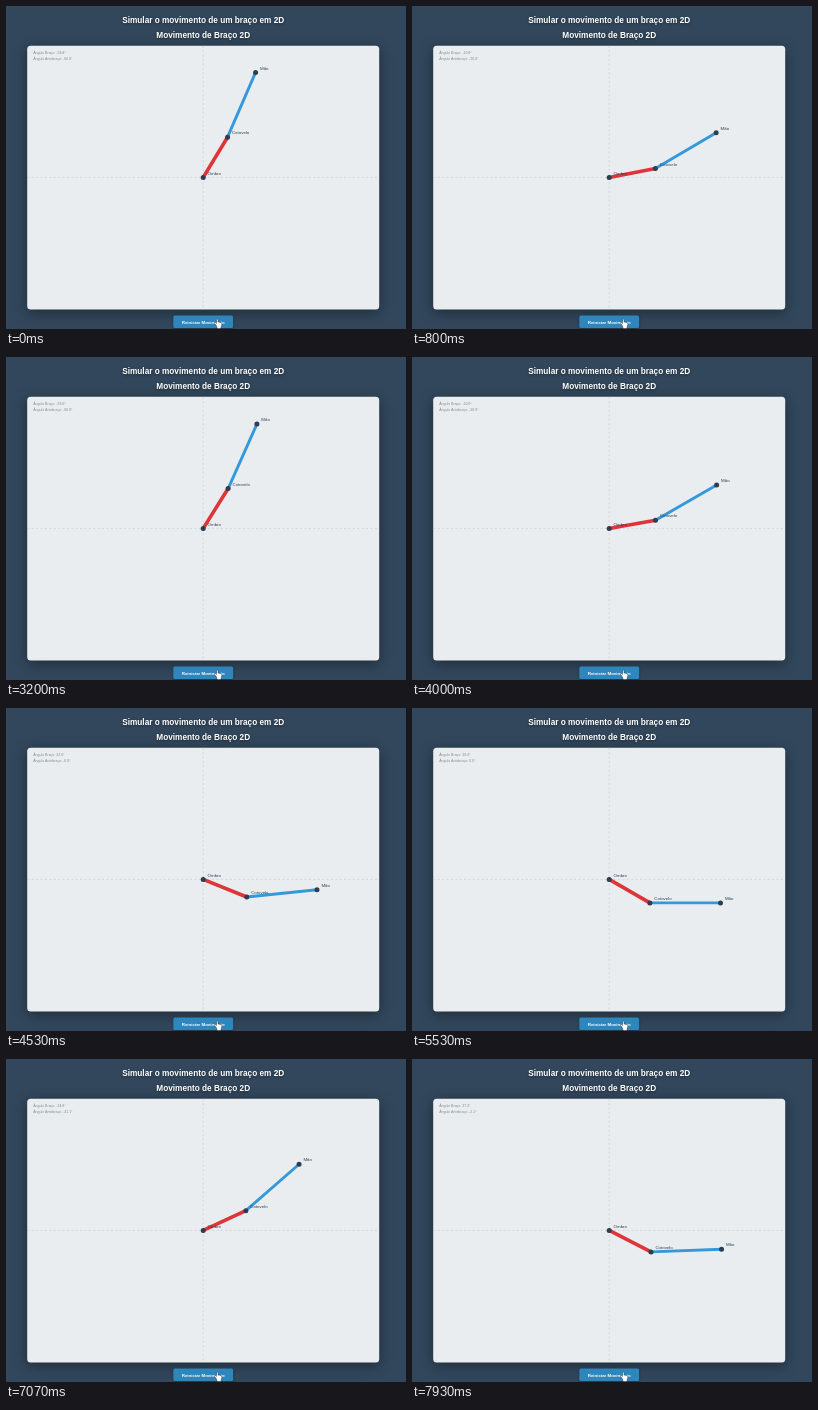
An HTML page with a canvas that plays this animation: 400x323 px, repeating every 8000 ms.

```html
<!DOCTYPE html>
<html lang="pt">
<head>
<meta charset="utf-8">
<title>Movimento de Braço 2D</title>
<style>
  html, body { margin: 0; width: 100%; height: 100%; overflow: hidden; background: #32475c; }
  canvas { display: block; width: 400px; height: 323px; }
</style>
</head>
<body>
<canvas id="stage"></canvas>
<script>
const W = 400, H = 323, LOOP = 8000, STEP = 1000 / 15;
const SWING = 2000;                    // ms for one downward swing
const STARTS = [-520, 2666, 5980];     // when each swing begins
const SHOULDER = { x: 197.2, y: 171.4 };
const UPPER = 47, FORE = 70.6;
const FONT = '"Liberation Sans", Arial, sans-serif';
const DARK = '#2c3e50';

const canvas = document.getElementById('stage');
const ctx = canvas.getContext('2d');
const dpr = window.devicePixelRatio || 1;
canvas.width = Math.round(W * dpr);
canvas.height = Math.round(H * dpr);
ctx.scale(dpr, dpr);

function text(str, x, y, size, color, { bold = false, align = 'left' } = {}) {
  ctx.font = `${bold ? 'bold ' : ''}${size}px ${FONT}`;
  ctx.textAlign = align;
  ctx.fillStyle = color;
  ctx.fillText(str, x, y);
}

function line(a, b, width, color) {
  ctx.beginPath();
  ctx.moveTo(a.x, a.y);
  ctx.lineTo(b.x, b.y);
  ctx.lineWidth = width;
  ctx.strokeStyle = color;
  ctx.stroke();
}

function box(x, y, w, h, r, color) {
  ctx.beginPath();
  ctx.roundRect(x, y, w, h, r);
  ctx.fillStyle = color;
  ctx.fill();
}

function withShadow(color, blur, dy, draw) {
  ctx.save();
  ctx.shadowColor = color;
  ctx.shadowBlur = blur * dpr;
  ctx.shadowOffsetY = dy * dpr;
  draw();
  ctx.restore();
}

function polar(from, length, degrees) {
  const a = degrees * Math.PI / 180;
  return { x: from.x + length * Math.cos(a), y: from.y + length * Math.sin(a) };
}

function joint(p, label) {
  ctx.beginPath();
  ctx.arc(p.x, p.y, 2.5, 0, Math.PI * 2);
  ctx.fillStyle = DARK;
  ctx.fill();
  text(label, p.x + 4.4, p.y - 2.9, 4.4, DARK);
}

function drawPage() {
  ctx.fillStyle = '#32475c';
  ctx.fillRect(0, 0, W, H);
  withShadow('rgba(0,0,0,0.4)', 3, 1, () => {
    const style = { bold: true, align: 'center' };
    text('Simular o movimento de um braço em 2D', 197.2, 16.5, 8.24, '#fff', style);
    text('Movimento de Braço 2D', 197.2, 31.9, 8.24, '#fff', style);
  });
  withShadow('rgba(0,0,0,0.4)', 13, 3, () => box(21.2, 39.7, 352, 263.8, 3.5, '#e9edf0'));

  ctx.setLineDash([2.2, 2.2]);
  line({ x: 21.2, y: SHOULDER.y }, { x: 373.2, y: SHOULDER.y }, 0.5, '#bdc3c7');
  line({ x: SHOULDER.x, y: 39.7 }, { x: SHOULDER.x, y: 303.5 }, 0.5, '#bdc3c7');
  ctx.setLineDash([]);
}

function drawArm(progress) {
  const armAngle = -90 + 120 * progress;
  const foreAngle = -90 + 90 * progress;
  const elbow = polar(SHOULDER, UPPER, armAngle);
  const hand = polar(elbow, FORE, foreAngle);

  ctx.lineCap = 'round';
  line(SHOULDER, elbow, 3.6, '#de3539');
  line(elbow, hand, 2.9, '#3498db');
  ctx.lineCap = 'butt';
  joint(SHOULDER, 'Ombro');
  joint(elbow, 'Cotovelo');
  joint(hand, 'Mão');

  text(`Ângulo Braço: ${armAngle.toFixed(1)}°`, 27.2, 48.3, 3.52, '#7f8c8d');
  text(`Ângulo Antebraço: ${foreAngle.toFixed(1)}°`, 27.2, 54.2, 3.52, '#7f8c8d');
}

function drawButton() {
  withShadow('rgba(0,0,0,0.3)', 3, 1, () => box(167.3, 309.4, 59.8, 12.6, 1.6, '#2f86bd'));
  text('Reiniciar Movimento', 197.2, 317.5, 4.4, '#fff', { bold: true, align: 'center' });
}

function drawCursor() {
  ctx.beginPath();
  ctx.moveTo(210, 319.2);
  ctx.lineTo(208.2, 317.2);
  ctx.quadraticCurveTo(208.4, 316, 209.8, 316.8);
  ctx.lineTo(210.5, 317.4);
  ctx.lineTo(210.5, 313.6);
  ctx.quadraticCurveTo(211.3, 312.5, 212.1, 313.6);
  ctx.lineTo(212.1, 316);
  ctx.lineTo(215, 316.6);
  ctx.quadraticCurveTo(216.1, 317, 215.9, 318.4);
  ctx.lineTo(214.8, 322.6);
  ctx.lineTo(211.3, 322.6);
  ctx.closePath();
  ctx.fillStyle = '#fff';
  ctx.fill();
  ctx.lineWidth = 0.5;
  ctx.strokeStyle = '#1c2630';
  ctx.stroke();
}

function render(now) {
  // The pose advances fifteen times a second.
  const t = Math.floor((now % LOOP + 5) / STEP) * STEP % LOOP;
  const start = STARTS.filter(s => s <= t).pop();
  drawPage();
  drawArm(Math.min(1, (t - start) / SWING));
  drawButton();
  drawCursor();
}

const origin = performance.now();
function tick() {
  render(performance.now() - origin);
  requestAnimationFrame(tick);
}
tick();
</script>
</body>
</html>
```
